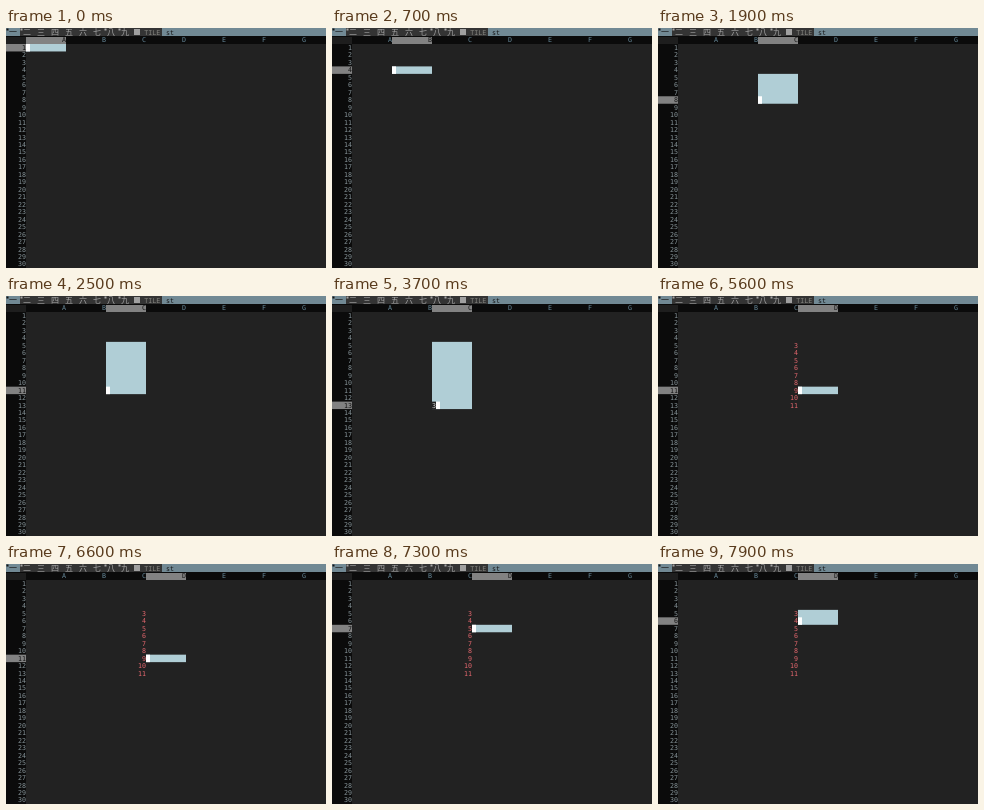
Write an HTML page with a canvas that moves like this. It is 320x240 px and loops after 8000 ms.

```html
<!DOCTYPE html>
<html lang="en">
<head>
<meta charset="utf-8">
<title>Terminal spreadsheet</title>
<style>
html, body { margin: 0; width: 100%; height: 100%; overflow: hidden; background: #222; }
canvas { display: block; width: 320px; height: 240px; }
</style>
</head>
<body>
<canvas id="stage" width="320" height="240"></canvas>
<script>
const ctx = document.getElementById('stage').getContext('2d');
const LOOP = 8000;
const CHAR = 4, COL = 40, LEFT = 20, TOP = 16, ROWS = 30;
const ROW = (240 - TOP) / ROWS, HEAD = TOP - 7;
const MONO = '6.65px "DejaVu Sans Mono", monospace';
const CJK = '8px "Noto Sans CJK JP", "Noto Sans CJK SC", "Noto Sans CJK", sans-serif';
const C = {
  sheet: '#222222', edge: '#0b0b0b', corner: '#1e1e1e', bar: '#343434', title: '#718994',
  label: '#879499', head: '#67899a', active: '#828282', ink: '#151515',
  pick: '#b0ced6', cursor: '#ffffff', num: '#e2666d', numPick: '#f0707a'
};

// Evenly spaced vi keys; capitals extend the selection, "." drops it
const RUNS = [
  { from: 200, to: 700, keys: 'jjjl' },
  { from: 900, to: 1200, keys: 'jl' },
  { from: 1500, to: 2700, keys: 'JJJJJJJJ' },
  { from: 4300, to: 4300, keys: '.' },
  { from: 4900, to: 5700, keys: 'kkll' },
  { from: 6600, to: 6600, keys: 'h' },
  { from: 6800, to: 7600, keys: 'kkkkkk' },
  { from: 7900, to: 7900, keys: 'J' }
];
const STEP = { h: [-1, 0], j: [0, 1], k: [0, -1], l: [1, 0], '.': [0, 0] };
const TYPE_AT = 3600, FILL_AT = 4300;

const colX = c => LEFT + c * COL;
const rowY = r => TOP + (r - 1) * ROW;
const baseline = r => rowY(r) + 5.9;

function cursorAt(t) {
  let col = 0, row = 1, start = 1;
  for (const { from, to, keys } of RUNS) {
    const gap = (to - from) / Math.max(1, keys.length - 1);
    [...keys].forEach((key, i) => {
      if (t < from + i * gap) return;
      const [dx, dy] = STEP[key.toLowerCase()];
      col += dx;
      row += dy;
      if (key === key.toLowerCase()) start = row;
    });
  }
  return { col, row, start };
}

function box(x, y, w, h, color) {
  ctx.fillStyle = color;
  ctx.fillRect(x, y, w, h);
}

function text(str, x, y, color, align = 'right', font = MONO) {
  ctx.font = font;
  ctx.textAlign = align;
  ctx.fillStyle = color;
  ctx.fillText(str, x, y);
}

function drawBar() {
  box(0, 0, 156, 8, C.bar);
  box(156, 0, 164, 8, C.title);
  box(0, 0, 14, 8, C.title);
  [...'一二三四五六七八九'].forEach((s, i) => {
    text(s, 7 + i * 14, 7.1, i ? '#a4a4a4' : C.ink, 'center', CJK);
    if (i < 2 || i > 6) box(i * 14 + 0.5, 0.5, 2, 2, i ? '#a4a4a4' : C.ink);
  });
  box(128, 1, 6, 6, '#a0a0a0');
  text('TILE', 138.3, 6.6, '#868680', 'left');
  text('st', 160, 6.6, C.ink, 'left');
}

function drawLabels(col, row) {
  box(0, 8, 320, TOP - 8, C.edge);
  box(0, HEAD, LEFT, TOP - HEAD, C.corner);
  box(0, TOP, LEFT, 240 - TOP, C.edge);
  box(colX(col), HEAD, COL, TOP - HEAD, C.active);
  box(0, rowY(row), LEFT, ROW, C.active);
  [...'ABCDEFG'].forEach((s, c) =>
    text(s, colX(c + 1), baseline(0), c === col ? C.ink : C.head));
  for (let r = 1; r <= ROWS; r++)
    text(r, LEFT, baseline(r), r === row ? C.ink : C.label);
}

function draw(t) {
  const { col, row, start } = cursorAt(t);
  const filled = t >= FILL_AT;
  const typing = t >= TYPE_AT && !filled;
  const onNumber = filled && col === 2;
  const x = colX(col), y = rowY(row);

  box(0, 0, 320, 240, C.sheet);
  drawBar();
  drawLabels(col, row);
  box(x, rowY(start), COL, (row - start + 1) * ROW, onNumber ? C.numPick : C.pick);

  if (typing) {
    box(x, y, CHAR, ROW, C.sheet);
    text('3', x, baseline(row), '#d0d0d0', 'left');
  }
  box(typing ? x + CHAR : x, y, CHAR, ROW, C.cursor);

  if (filled)
    for (let r = 5; r <= 13; r++)
      text(r - 2, colX(3), baseline(r), onNumber && r === row ? C.ink : C.num);
}

function tick() {
  draw(performance.now() % LOOP);
  requestAnimationFrame(tick);
}
tick();
</script>
</body>
</html>
```
